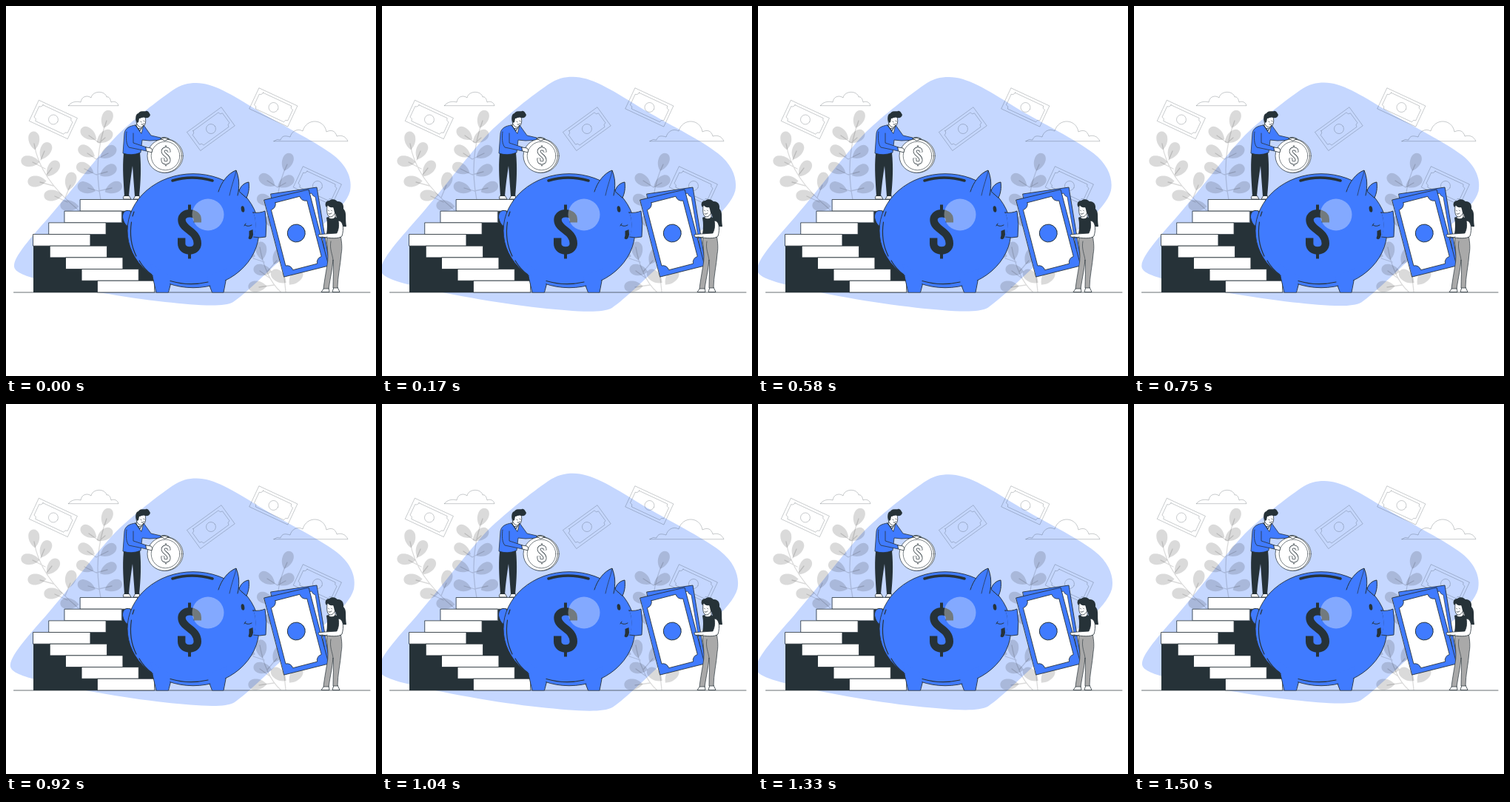
These frames come from a looping animation (500 by 500 pixels, 1540 ms). An HTML page with a canvas:

```html
<!DOCTYPE html>
<html lang="en">
<head>
<meta charset="utf-8">
<title>Piggy bank savings</title>
<style>
html, body { margin: 0; width: 100%; height: 100%; overflow: hidden; background: #fff; }
canvas { display: block; width: 500px; height: 500px; }
</style>
</head>
<body>
<canvas id="stage"></canvas>
<script>
const BLUE = '#407bff', DARK = '#263238', PALE = '#c5d7ff', WHITE = '#fff';
const FAINT = 'rgba(38,50,56,.32)', FOLIAGE = 'rgba(0,0,0,.145)';
const LOOP = 1540;

const canvas = document.getElementById('stage');
const ratio = window.devicePixelRatio || 1;
canvas.width = canvas.height = 500 * ratio;
const ctx = canvas.getContext('2d');
ctx.scale(ratio, ratio);
ctx.lineJoin = ctx.lineCap = 'round';

function paint(path, fill, stroke, width = 0.8) {
  if (fill) { ctx.fillStyle = fill; ctx.fill(path); }
  if (stroke) { ctx.strokeStyle = stroke; ctx.lineWidth = width; ctx.stroke(path); }
}
const shape = (d, fill, stroke, width) => paint(new Path2D(d), fill, stroke, width);

function oval(x, y, rx, ry, fill, stroke, width, turn = 0) {
  const path = new Path2D();
  path.ellipse(x, y, rx, ry, turn, 0, Math.PI * 2);
  paint(path, fill, stroke, width);
}

function placed(x, y, degrees, draw) {
  ctx.save();
  ctx.translate(x, y);
  ctx.rotate(degrees * Math.PI / 180);
  draw();
  ctx.restore();
}

// Rectangle with scooped corners, centred on the origin
function scooped(w, h, r) {
  const x = w / 2, y = h / 2;
  return `M${r - x} ${-y}H${x - r}A${r} ${r} 0 0 0 ${x} ${r - y}V${y - r}A${r} ${r} 0 0 0 ${x - r} ${y}` +
    `H${r - x}A${r} ${r} 0 0 0 ${-x} ${y - r}V${r - y}A${r} ${r} 0 0 0 ${r - x} ${-y}Z`;
}

function outlineBill(x, y, degrees) {
  placed(x, y, degrees, () => {
    shape('M-28.5-15.5H28.5V15.5H-28.5Z', null, FAINT, 0.7);
    shape(scooped(50, 24, 4), null, FAINT, 0.7);
    oval(0, 0, 6.5, 6.5, null, FAINT, 0.7);
  });
}

// Each leaf: centre x, centre y, direction towards the tip in degrees
function plant(stems, leaves) {
  const drop = new Path2D('M-12 0C-6-7 1-8 6-7C14-5 14 5 6 7C1 8-6 7-12 0Z');
  const all = new Path2D();
  for (const [x, y, a] of leaves) {
    all.addPath(drop, new DOMMatrix().translate(x, y).rotate(a).scale(1.05, 1.02));
  }
  paint(all, FOLIAGE);
  shape(stems, null, FOLIAGE, 1.3);
}

function dollar(x, y, size, outline) {
  const curve = 'M10.8-13V-17C10.8-28-10.5-28-10.5-16.5C-10.5-3 10.8-2 10.8 15.5C10.8 28-10.8 28-10.8 15.5V8';
  const bar = 'M0-37V-26M0 26V36';
  const strokes = (color, extra) => {
    ctx.lineCap = 'butt';
    shape(bar, null, color, 4 + extra);
    shape(curve, null, color, 10.4 + extra);
    ctx.lineCap = 'round';
  };
  ctx.save();
  ctx.translate(x, y);
  ctx.scale(size, size);
  strokes(DARK, outline ? 2 : 0);
  if (outline) strokes(WHITE, -1.8);
  ctx.restore();
}

function blobScale(t) {
  const keys = [0, 380, 795, 1195, 1500];
  if (t >= 1500) return 1;
  const i = keys.findIndex((key, n) => t < keys[n + 1]);
  const u = (t - keys[i]) / (keys[i + 1] - keys[i]);
  const eased = 0.5 - 0.5 * Math.cos(Math.PI * (i ? u : u ** 0.8));
  return 1 + 0.1 * (i % 2 ? 1 - eased : eased);
}

function drawBlob(t) {
  const s = blobScale(t);
  ctx.save();
  ctx.translate(238.5, 254.5);
  ctx.scale(s, s);
  ctx.translate(-238.5, -254.5);
  shape('M257 104C280 104 304 119 343 143C378 164 420 184 443 202C462 217 468 235 465 250' +
    'C458 276 414 306 378 337C352 360 325 388 307 400C293 408 255 404 215 400' +
    'C160 394 92 382 42 369C20 363 10 358 11 350C12 336 40 306 60 283' +
    'C92 246 126 200 150 175C175 151 205 128 225 114C237 106 246 104 257 104Z', PALE);
  ctx.restore();
}

function drawBackground() {
  plant('M38 186C43 218 62 246 98 276M47 208L52 196M53 220L36 211M55 228L62 219M64 243L46 238M80 259L87 242M83 265L66 257', [
    [38, 182, -95], [53, 196, -65], [33, 210, 185], [63, 220, -55],
    [42, 237, 178], [87, 237, -75], [64, 256, 178], [86, 270, 185]
  ]);
  plant('M136 155C123 190 121 226 128 262M126 185L112 175M126 185L134 178M122 207L110 199M122 207L138 199' +
    'M122 228L106 220M122 228L137 224M125 250L111 246M125 250L143 246', [
    [136, 153, -70], [112, 173, 215], [133, 177, -35], [109, 197, 210], [138, 198, -35],
    [107, 220, 205], [138, 223, -30], [109, 246, 200], [145, 246, -25]
  ]);
  plant('M380 214C367 240 362 270 370 310L378 386M367 245L353 236M367 245L378 239M363 270L351 262', [
    [380, 211, -70], [353, 236, 215], [378, 238, -30], [351, 263, 205], [381, 262, -30],
    [362, 292, 205], [391, 367, -50], [369, 366, 220]
  ]);
  plant('M343 326C347 350 357 374 371 386M349 346L334 341M353 359L366 344M357 368L343 358M362 377L342 380', [
    [345, 331, -95], [325, 334, 200], [368, 338, -60], [347, 357, 190], [340, 379, 178]
  ]);
  outlineBill(64, 153.5, 25);
  outlineBill(277, 166, -36);
  outlineBill(361.5, 137, 25);
  outlineBill(421, 243, 25);
  shape('M84.5 134.7H152C151 130 146 128 142 130C141 125 139 122 136 123C134 114 117 114 115 124' +
    'C110 120 102 122 101 130C95 128 87 130 84.5 134.7Z', null, FAINT, 0.8);
  shape('M362 182.7H462C459 176 453 174 447 176C445 168 439 167 433 170C430 152 406 151 401 169' +
    'C394 165 386 169 384 177C377 175 373 175 371 181Q366 179 362 182.7Z', null, FAINT, 0.8);
}

function drawStairs() {
  shape('M157 277H200V387H37V324H114V309H135V293H157Z', DARK);
  for (let row = 0; row < 8; row++) {
    const x = row < 4 ? 100.5 - 21.2 * row : 59.5 + 21.4 * (row - 4);
    const y = 261.5 + row * 15.68;
    shape(`M${x} ${y}h77v15.68h-77Z`, WHITE, DARK);
  }
}

function drawMan() {
  shape('M160 256C158 258 158 260 159 261H169L166 256ZM175 256L172 261H181L180 256Z', WHITE, DARK);
  shape('M159 199C157 220 159 238 160 257H166C167 243 169 229 171 216C172 230 173 244 174 257H180C182 238 183 218 181 198Z', DARK);
  shape('M177 158L175 165L184 166L186 158Z', WHITE, DARK);
  shape('M176 152C175 159 179 164 183 164C188 163 190 157 188 150Z', WHITE, DARK);
  shape('M177 158C174 152 175 146 179 145C181 141 187 143 189 142C192 141 193 144 195 147' +
    'C194 151 191 152 188 151C185 149 183 152 180 152L179 157Z', DARK);
  shape('M182 156l1 1M186 155l1 1M183 160q2 1 4-1', null, DARK, 0.8);
  shape('M207 180C211 176 217 177 221 180L218 182L208 182Z', WHITE, DARK);
  shape('M175 161C167 162 161 165 160 172L158 199Q170 203 182 198L184 181L194 182L210 181L209 178' +
    'L196 175L186 161L181 169Z', BLUE, DARK);
  shape('M175 161L181 169L186 161L183 172Z', WHITE, DARK);
  shape('M163 170C162 178 162 186 166 191L190 196L190 191L172 185L172 172', BLUE, DARK);
  oval(215.6, 202.5, 23.7, 22.8, WHITE, DARK, 0.7);
  oval(214.2, 202.5, 23.2, 22.8, WHITE, DARK, 0.7);
  oval(215.5, 202.5, 19.3, 19.3, null, DARK, 0.6);
  dollar(216, 202.5, 0.38, true);
  shape('M189 191L196 192Q199 195 197 198L190 196Z', WHITE, DARK);
  shape('M209 179Q214 177 220 180L215 182Z', WHITE, DARK);
}

function drawPig() {
  shape('M168 277C160 274 156 281 158 288C160 295 164 300 170 297', BLUE, DARK, 1);
  shape('M194 348L203 387H219.5L224 370H272L278.5 387H294L300 356Z', BLUE, DARK, 0.9);
  oval(253, 303.7, 89, 77, BLUE, DARK, 0.9);
  shape('M195 348L203.7 386.5H219L223.5 365ZM272 365L279 386.5H293.4L299 354Z', BLUE);
  shape('M287 251C291 238 300 226 311 222C315 232 316 243 313 256', BLUE, DARK, 1);
  shape('M302 256C305 242 309 232 311 223M319 254Q321 246 326 242', null, DARK, 0.7);
  shape('M315 250C317 243 322 239 328 238C329 246 328 253 325 259Z', BLUE, DARK, 1);
  shape('M334 279C339 280 346 279 350 277Q353 294 351 312Q343 314 334 312Q340 296 334 279Z', BLUE, DARK, 0.9);
  shape('M334 281Q339 296 334 311', null, BLUE, 2);
  shape('M323 296Q327 299 332 296M322 297Q323 295 324 294', null, DARK, 1);
  shape('M328.5 304Q329 310 327.5 314Q332 318 334 309L333.5 302Z', DARK);
  oval(320, 274.5, 2.3, 4.2, DARK, null, 0, -0.15);
  shape('M225 236Q251 228 279 236', null, DARK, 3.6);
  shape('M169.5 292C167 308 169 324 176 338M173 278L171 284M180 344Q187 356 197 363', null, DARK, 1.2);
  shape('M222 371.5Q247 379 273 373', null, DARK, 1.2);
  dollar(248, 305.5, 1);
  oval(273, 282, 21.5, 21.5, 'rgba(255,255,255,.35)');
}

function drawBills() {
  shape('M358 254L420 245L437 348L376 359Z', BLUE, DARK, 0.9);
  shape('M409 254L413 253Q414 257 418 258L430 328Z', WHITE, DARK, 0.7);
  shape('M349 262L409 248L436 351L376 366Z', BLUE, DARK, 0.9);
  placed(392.3, 307, -14.5, () => {
    shape(scooped(50, 94, 8), WHITE, DARK, 0.8);
    oval(0, 0, 12, 12, BLUE, DARK, 0.9);
  });
}

function drawWoman() {
  shape('M430 381L426 386.5H437L436 381ZM443 380L441 386.5H451L448 380Z', WHITE, DARK);
  shape('M434 309C432 320 437 335 434 350C432 362 430 373 429 382H436C438 368 441 356 442 343' +
    'C443 356 442 370 442 381H448C448 366 452 350 453 335C455 325 453 316 452 309Z', '#a9a9a9', DARK, 0.7);
  shape('M439 318C437 328 441 335 442 343', null, DARK, 0.6);
  shape('M444 265C452 262 457 267 456 274C461 279 458 285 460 298C453 300 448 293 446 283Z', DARK);
  shape('M437 280L436 288H445L445 278Z', WHITE, DARK);
  shape('M434 270C433 279 434 285 439 285C444 284 447 276 446 270Z', WHITE, DARK);
  shape('M433 272C430 268 432 263 437 263C440 260 447 261 449 266C453 272 449 278 447 282' +
    'C443 281 444 276 442 272Q437 273 435 269Z', DARK);
  shape('M435.5 276l1 1M439.5 276l1 1M436 281q2 1 4-1', null, DARK, 0.8);
  shape('M433 286L435 285Q440 290 445 285L450 288L453 308H433Q435 297 433 286Z', DARK);
  shape('M449 290C456 290 457 301 454 311C450 315 438 314 427 312Q422 314 422 309L431 308L447 307Q451 299 449 290Z', WHITE, DARK);
  shape('M424 312Q430 315 434 312', null, DARK, 0.7);
}

function render(t) {
  ctx.fillStyle = WHITE;
  ctx.fillRect(0, 0, 500, 500);
  drawBlob(t);
  drawBackground();
  shape('M10.5 387H492', null, DARK, 0.7);
  drawStairs();
  drawMan();
  drawPig();
  drawBills();
  drawWoman();
}

const start = performance.now();
function tick() {
  render((performance.now() - start) % LOOP);
  requestAnimationFrame(tick);
}
tick();
</script>
</body>
</html>
```
